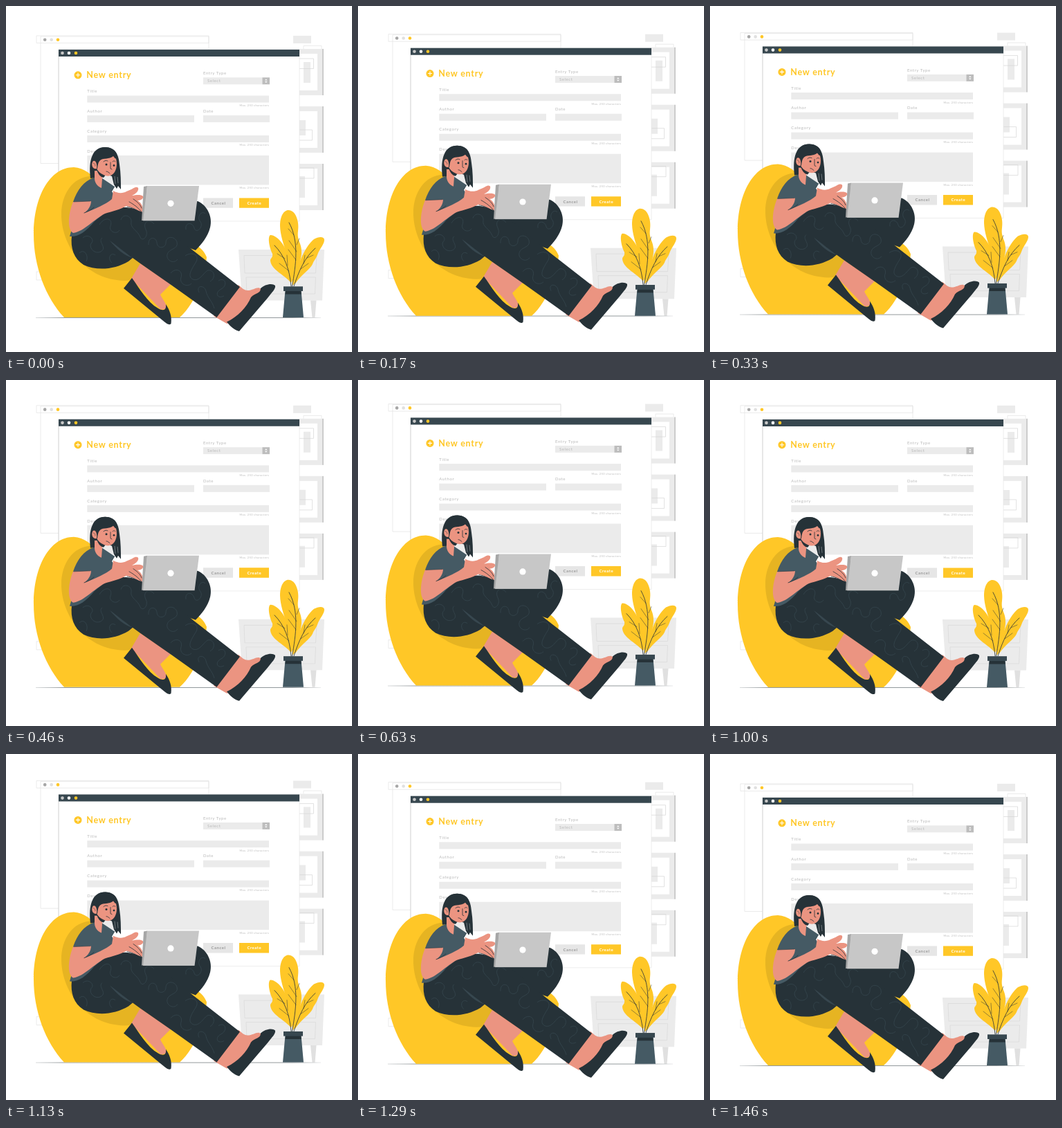
Animation of 500 by 500 pixels, one loop 1.5 s. Source, as an HTML page:

```html
<!DOCTYPE html>
<html lang="en">
<head>
<meta charset="utf-8">
<title>New entry</title>
<style>
  html, body { margin: 0; width: 100%; height: 100%; overflow: hidden; background: #fff; }
  svg { display: block; width: 100%; height: 100%; }
  text { font-family: Lato, "Open Sans", sans-serif; }
  .label { font-size: 6px; letter-spacing: .58px; fill: #b8b8b8; }
  .hint { font-size: 4px; letter-spacing: .36px; fill: #b8b8b8; text-anchor: end; }
  .button { font-size: 6px; font-weight: 700; letter-spacing: .5px; text-anchor: middle; }
  .line { fill: none; stroke: #e3e3e3; stroke-width: .7; }
  .ink { fill: none; stroke: #263238; stroke-width: .8; stroke-linecap: round; }
  .thin { stroke-width: .5; }
  .pale { fill: #ebebeb; }
  .dark { fill: #263238; }
  .slate { fill: #455a64; }
  .yellow { fill: #ffc727; }
  .skin { fill: #eb9481; }
</style>
</head>
<body>
<svg viewBox="0 0 500 500">
<defs>
  <linearGradient id="floor">
    <stop offset="0" stop-color="#263238" stop-opacity=".35"/>
    <stop offset=".1" stop-color="#263238"/>
    <stop offset=".9" stop-color="#263238"/>
    <stop offset="1" stop-color="#263238" stop-opacity=".2"/>
  </linearGradient>
</defs>
<g id="scene">
  <!-- wall -->
  <path class="line" d="M50 44H293V227.500H50ZM44 43H293V53.500H44ZM44 384H64V396H44ZM430 62V57.500H456V62"/>
  <circle cx="56.200" cy="48.800" r="2.300" fill="#a6a6a6"/>
  <circle cx="65.700" cy="48.800" r="2.300" fill="#e0e0e0"/>
  <circle cx="75" cy="48.800" r="2.300" class="yellow"/>
  <path class="pale" d="M415 43H441V54H415Z"/>
  <g id="frames"></g>
  <path class="pale" d="M430 81H440V111H430ZM424 165H433V187H424ZM424 246H432V277H424Z"/>
  <path class="line" d="M424 76H444.500V90.500H424M424 179H442.500V194H424M424 234H445V249H424" style="stroke:#d6d6d6"/>

  <!-- form -->
  <path d="M76 63H424V311H76Z" fill="#fff" stroke="#e6e6e6" stroke-width=".7"/>
  <path d="M76 73V240" stroke="#ccc" stroke-width=".7"/>
  <path d="M76 63H424V73H76Z" fill="#37474f"/>
  <circle cx="81.500" cy="68" r="2.300" fill="#c7c7c7"/>
  <circle cx="91" cy="68" r="2.300" fill="#fff"/>
  <circle cx="101" cy="68" r="2.300" class="yellow"/>
  <circle cx="104" cy="99.800" r="5.500" class="yellow"/>
  <path d="M101 99.800H107M104 96.800V102.800" stroke="#fff" stroke-width="1.100"/>
  <text x="116.300" y="104.400" class="yellow" font-size="12.500" font-weight="700" letter-spacing=".75">New entry</text>
  <g id="form"></g>
  <path d="M370.500 103.300H381V113.300H370.500Z" fill="#bdbdbd"/>
  <path d="M374 107.500L375.800 105.500L377.600 107.500ZM374 109L375.800 111L377.600 109Z" fill="#fff"/>
  <path d="M285 277.500H328V291.800H285Z" fill="#e6e6e6"/>
  <path d="M337 277.500H380V291.800H337Z" class="yellow"/>
  <text class="button" x="307" y="286.800" fill="#999">Cancel</text>
  <text class="button" x="358.800" y="286.800" fill="#fff">Create</text>

  <!-- cabinet -->
  <path class="pale" d="M336 352H460L457 425.500H341Z"/>
  <path d="M440 425.500H448.500L446.500 450H442.500Z" fill="#e0e0e0"/>
  <path d="M344 360.500H449L447.500 386H345ZM347 392H447.500L446.500 416H348Z" class="line" style="stroke:#d9d9d9"/>
  <path d="M43 450.100H455V450.600H43Z" fill="url(#floor)"/>

  <!-- plant -->
  <g class="yellow">
    <path d="M412 400C402 388 383 381 382 368C382 364 386 364 385 358C380 348 378 333 382 331C394 331 413 354 414 396Z"/>
    <path d="M416 402C418 383 430 349 445 337C452 333 460 333 460 338C460 344 454 350 451 357C448 366 445 367 443 373C439 381 428 387 418 401Z"/>
    <path d="M414 403C413 365 397 345 396 318C396 301 403 295 408 295C419 295 424 312 422 325C420 340 428 342 427 358C426 372 418 390 415.500 403Z"/>
  </g>
  <path class="ink" d="M413.500 405C419 374 424 340 409 313M412 405C410 380 402 360 388 346M416 405C423 383 432 363 447 350"/>
  <path class="ink thin" d="M420 355L409 339M419 367L408 352M420 345L424 336M416 331L408 322M409 383L395 372M407 375L406 360M403 365L392 358M426 380L437 372M430 372L432 360M435 364L444 360"/>
  <path class="slate" d="M403.500 411H426.500L430 450H400Z"/>
  <path d="M401 405.300H429V412H401Z" fill="#37474f"/>
  <path class="dark" d="M404 412H426.300L426.700 416.500H403.600Z"/>

  <!-- bean bag -->
  <path class="yellow" d="M84 450C57 421 40 376 40 330C40 276 63 233 98 233C128 235 145 270 160 310C210 320 282 335 290 363C288 386 276 428 251 450Z"/>
  <path d="M124 246C96 246 80 273 80 301C80 345 112 390 160 396C172 398 181 397 186 393L195 370L150 290Z" fill="#e6b422"/>

  <!-- legs -->
  <path class="skin" d="M194 372L238 402L223 417C226 424 232 429 232 437L224 439L181 394Z"/>
  <path class="dark" d="M182 393L170 408L226 454C232 459 236 462 238.500 459C240 449 237 440 231 431C232 440 227 441 220 437C204 428 193 408 182 393Z"/>
  <path class="skin" d="M300 448L336 403C341 408 345 411 349 411C358 411 363 404 369 409L364 425L333 455L319 459Z"/>
  <path class="dark" d="M319 456.500C335 449 348 435 354 421C360 414 368 416 368 408C374 402 385 400 389 404C390 409 384 414 378 422L337 470C331 469 323 462 319 456.500Z"/>
  <path class="dark" d="M198 298L277 282C291 288 299 305 295 320C292 333 282 345 274 353L225 335Z"/>
  <path class="dark" d="M95 332C93 350 98 365 112 374C131 383 157 381 177 369L183 364L194 372L240 404L304.500 450L338 406L270 353L220 311L199 299C180 287 153 289 130 302C117 318 105 326 95 332Z"/>
  <path d="M150 339C165 350 174 358 183 364C171 361 160 351 150 339Z" fill="#37474f"/>
  <g fill="none" stroke="#3b4d56" stroke-width=".6">
    <path d="M111 335C119 328 128 337 124 342C118 347 127 360 137 355C147 349 132 341 139 335"/>
    <path d="M135 316C143 303 155 307 151 318C148 326 160 331 164 324M166 309C169 299 182 303 181 312C179 321 190 324 194 334C197 342 207 332 202 323C197 313 206 306 214 315"/>
    <path d="M206 345C205 333 217 333 218 342C219 352 231 350 231 342C231 332 244 332 247 341C250 352 235 350 233 359C231 367 242 374 248 366"/>
    <path d="M259 361C269 354 281 360 274 371C267 382 262 391 270 395C280 399 286 384 292 382C302 381 303 394 295 398"/>
    <path d="M307 397C317 391 321 404 311 409C301 414 305 424 315 419M279 414C274 403 287 403 289 412C291 422 298 426 301 437M238 386C246 377 256 383 253 392C250 402 262 407 268 401"/>
    <path d="M260 323C258 312 270 312 272 321C275 330 286 319 281 312C275 305 282 295 288 300M158 360C151 355 146 365 153 371M106 357C113 350 120 361 116 369"/>
  </g>

  <!-- body -->
  <path class="slate" d="M127 248C112 253 103 266 97 283L104 291L92 333C104 334 115 327 128 311L152 292L158 276L153 268L157 261L139 249Z"/>
  <path class="skin" d="M97 283L123 282C123 289 118 296 113 299C128 294 145 286 153 279L155 267C161 271 169 271 174 268C180 266 184 263 187 262C192 261 192 265 190 268C188 271 184 273 182 274C188 273 195 272 198 275C199 279 194 281 190 281C196 285 198 289 198 298C188 295 181 290 174 289C165 294 153 297 143 300C127 308 113 326 97 328C87 322 91 297 97 283Z"/>
  <path class="ink" d="M113 299C119 297 124 294 127 291M175 290C183 291 190 295 197 301M178 283C185 287 191 291 197 299M184 279C190 283 194 287 196 292"/>
  <path class="ink thin" d="M98 283L122 282M153 267L157 261"/>

  <!-- head -->
  <path class="dark" d="M122 249C119 222 125 204 143 204C158 204 163 215 164 229C166 242 166 254 166 265L162 260L160 264L156 258L153 246L130 238L130 248Z"/>
  <path class="skin" d="M128 238L140 240L139 250L138 263C132 261 128 255 128 249Z"/>
  <path class="dark" d="M131 236C133 243 136 247 141 248L145 243Z"/>
  <path class="skin" d="M130 221L157 215C161 224 161 233 157 240C153 246 147 247 141 244C136 242 133 239 131 235Z"/>
  <path class="dark" d="M126 226C126 211 133 204 144 204C156 205 161 211 161 220C158 222 157 219 155 217C149 222 141 219 136 223C133 226 133 229 132 235L129 236Z"/>
  <path class="skin" d="M131 235C125 237 122 228 126 224C130 222 132 229 131 235Z"/>
  <path class="ink thin" d="M126 227C128 227 129 229 129 231"/>
  <circle class="dark" cx="145" cy="229" r="1.500"/>
  <circle class="dark" cx="156" cy="230.500" r="1.400"/>
  <path class="ink" d="M141 225C143 223 145 223 147 224M154 225C156 223 157 224 158 225M151 226V235L153 236M145 239C147 239 149 241 150 242"/>
  <path d="M157 246L158 257M161 247L162 256" stroke="#d9dee0" stroke-width=".4"/>

  <!-- laptop -->
  <path d="M199 261L204 260L201 310H196Z" fill="#a6a6a6"/>
  <path d="M204 260H279L272.500 310.500H198Z" fill="#c7c7c7"/>
  <path class="ink thin" d="M197 310.700H272.500"/>
  <circle cx="238" cy="285.300" r="4.600" fill="#fff"/>
</g>
</svg>
<script>
  const byId = id => document.getElementById(id);
  const box = (x, y, w, h, fill = '#ebebeb') =>
    `<rect x="${x}" y="${y}" width="${w}" height="${h}" fill="${fill}"/>`;
  const text = (type, x, y, words) => `<text class="${type}" x="${x}" y="${y}">${words}</text>`;

  byId('frames').innerHTML = [62, 145, 228].map(y =>
    box(424, y, 33, 67) + box(457, y, 2, 67, '#ccc') + box(424, y + 7, 26, 53, '#fff')
  ).join('');

  const fields = [
    ['Entry Type', 285, 103.3, 86, 10],
    ['Title', 117.3, 129.5, 262.7, 10],
    ['Author', 117.3, 158, 154.7, 10],
    ['Date', 285, 158, 96, 10],
    ['Category', 117.3, 187, 262.7, 10],
    ['Description', 117.3, 216, 262.7, 42.5]
  ];
  byId('form').innerHTML = fields.map(([name, x, y, w, h]) =>
    box(x, y, w, h) + text('label', x, y - 4.3, name)
  ).join('')
    + [145, 202.5, 264].map(y => text('hint', 380, y, 'Max. 250 characters')).join('')
    + text('label', 291, 110.4, 'Select');

  // Steady float: 10 px up and back down
  const PERIOD = 1500, RISE = 10, LEAD = 20;
  const scene = byId('scene');
  const start = performance.now();
  function draw(now) {
    const phase = Math.max(0, now - start + LEAD) % PERIOD / PERIOD;
    const lift = RISE * (1 - Math.abs(1 - 2 * phase));
    scene.setAttribute('transform', `translate(0 ${(0.27 - lift).toFixed(3)})`);
    requestAnimationFrame(draw);
  }
  draw(start);
</script>
</body>
</html>
```
